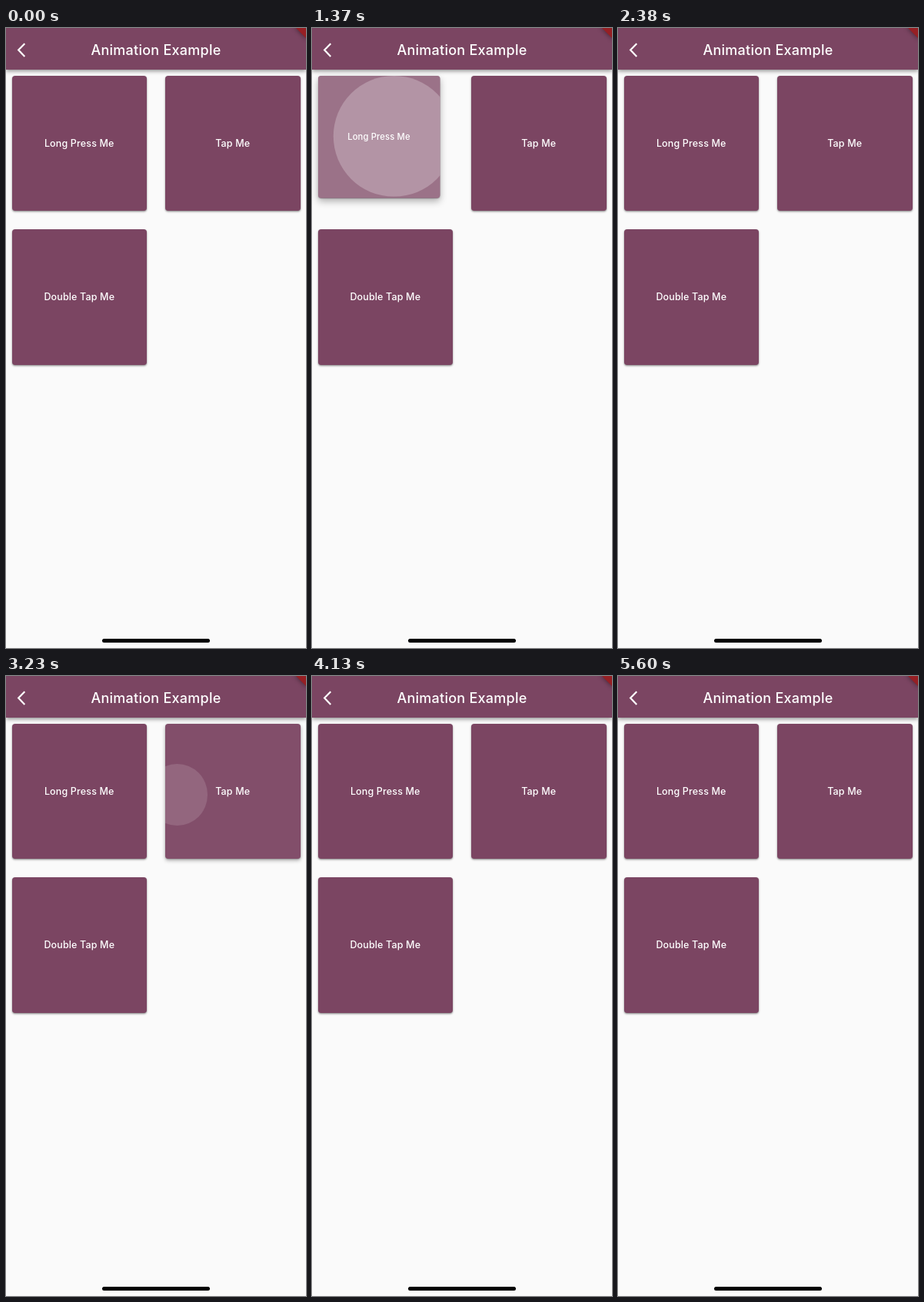
An HTML page for the animation above (7.02 s loop, 390x804 px).

```html
<!DOCTYPE html>
<html lang="en">
<head>
<meta charset="utf-8">
<title>Animation Example</title>
<style>
  html, body { margin: 0; width: 100%; height: 100%; overflow: hidden; background: #fafafa; }
  body { position: relative; font-family: Inter, Roboto, sans-serif; font-weight: 500; color: #fff; }
  .bar {
    position: absolute; z-index: 1; left: 0; top: 0; width: 390px; height: 54px;
    background: #7b4562; box-shadow: 0 2px 5px rgba(0, 0, 0, .42);
  }
  .bar svg { position: absolute; left: 0; top: 0; }
  .bar h1 {
    margin: 0; text-align: center; font-size: 18px; font-weight: 500;
    line-height: 57px; letter-spacing: .25px;
  }
  .card {
    position: absolute; width: 175.5px; height: 175.5px; border-radius: 4px;
    background: #7b4562; overflow: hidden; transform-origin: 0 0;
  }
  .card i, .card span { position: absolute; left: 0; top: 0; width: 100%; height: 100%; }
  .card i { background: #fff; opacity: 0; }
  .card .ripple { width: 2px; height: 2px; border-radius: 50%; }
  .card span {
    text-align: center; font-size: 12.5px; line-height: 175.5px;
    letter-spacing: .15px; white-space: nowrap;
  }
  .home {
    position: absolute; left: 125px; top: 792px; width: 140px; height: 5px;
    border-radius: 2.5px; background: #000;
  }
</style>
</head>
<body>
<div class="bar">
  <svg width="390" height="54">
    <defs><filter id="soft" x="-50%" y="-50%" width="200%" height="200%"><feGaussianBlur stdDeviation="3"/></filter></defs>
    <path d="M375 -2H392V15Z" fill="#000" opacity=".5" filter="url(#soft)"/>
    <path d="M377 0H390V13Z" fill="#961f24"/>
    <path d="M24.3 20.3L16.2 28.6L24.3 36.9" fill="none" stroke="#fff" stroke-width="2.2"/>
  </svg>
  <h1>Animation Example</h1>
</div>
<div class="home"></div>
<script>
const LOOP = 7020, SIZE = 175.5, MID = SIZE / 2, REACH = MID * Math.SQRT2;
const WHITE = 0.24, SHRINK = 0.1;
// Times at which the 50 ms step grid restarts
const GRID = [0, 1720, 1980, 4950];

const cards = [
  { label: 'Long Press Me', x: 7.5, y: 61.5, touch: [136.5, 86], down: 1033, up: 1981, hold: true },
  { label: 'Tap Me', x: 207, y: 61.5, touch: [13.5, 92.6], down: 3188, up: 3740 },
  { label: 'Double Tap Me', x: 7.5, y: 261, touch: [113.7, 56], down: 4928, up: 5205 }
];

const clamp = v => Math.max(0, Math.min(1, v));
const mix = (a, b, p) => a + (b - a) * p;

// cubic-bezier(.25, .1, .25, 1)
function ease(x) {
  const bez = (a, b, s) => 3 * a * s * (1 - s) ** 2 + 3 * b * s * s * (1 - s) + s ** 3;
  let lo = 0, hi = 1;
  for (let i = 0; i < 24; i++) {
    const m = (lo + hi) / 2;
    if (bez(.25, .25, m) < x) lo = m; else hi = m;
  }
  return bez(.1, 1, lo);
}

for (const c of cards) {
  c.el = document.createElement('div');
  c.el.className = 'card';
  c.el.style.left = c.x + 'px';
  c.el.style.top = c.y + 'px';
  c.el.innerHTML = `<i></i><i class="ripple"></i><span>${c.label}</span>`;
  [c.glow, c.ripple] = c.el.querySelectorAll('i');
  document.body.append(c.el);
}

function shrinkAt(c, t) {
  if (c.hold) return clamp((t - c.down) / 100) - clamp((t - c.up) / 100);
  return clamp(1 - Math.abs(t - c.up - 100) / 100);
}

function drawCard(c, t) {
  const held = t - c.down, free = t - c.up;
  const press = clamp(held / 200) - clamp(free / 200);
  const grow = free < 0
    ? clamp(held / 1000)
    : clamp((c.up - c.down) / 1000 + free / 225);
  const p = ease(grow);
  const r = mix(REACH * 0.3, REACH + 5, p);
  const left = mix(c.touch[0], MID, p) - r, top = mix(c.touch[1], MID, p) - r;
  const lift = 2 + 6 * ease(press);

  c.el.style.transform = `scale(${1 - SHRINK * shrinkAt(c, t)})`;
  c.el.style.boxShadow =
    `0 ${lift * 0.6}px ${lift * 1.3}px rgba(0,0,0,.3), 0 1px 2px rgba(0,0,0,.2)`;
  c.glow.style.opacity = WHITE * press;
  Object.assign(c.ripple.style, {
    left: left + 'px', top: top + 'px', width: 2 * r + 'px', height: 2 * r + 'px',
    opacity: WHITE * clamp(held / 75) * (1 - clamp((free - 225) / 150))
  });
}

function draw(time) {
  const base = GRID.filter(g => g <= time).pop();
  const t = base + 50 * Math.floor((time - base) / 50);
  cards.forEach(c => drawCard(c, t));
}

const start = performance.now();
function tick() {
  draw((performance.now() - start) % LOOP);
  requestAnimationFrame(tick);
}
tick();
</script>
</body>
</html>
```
